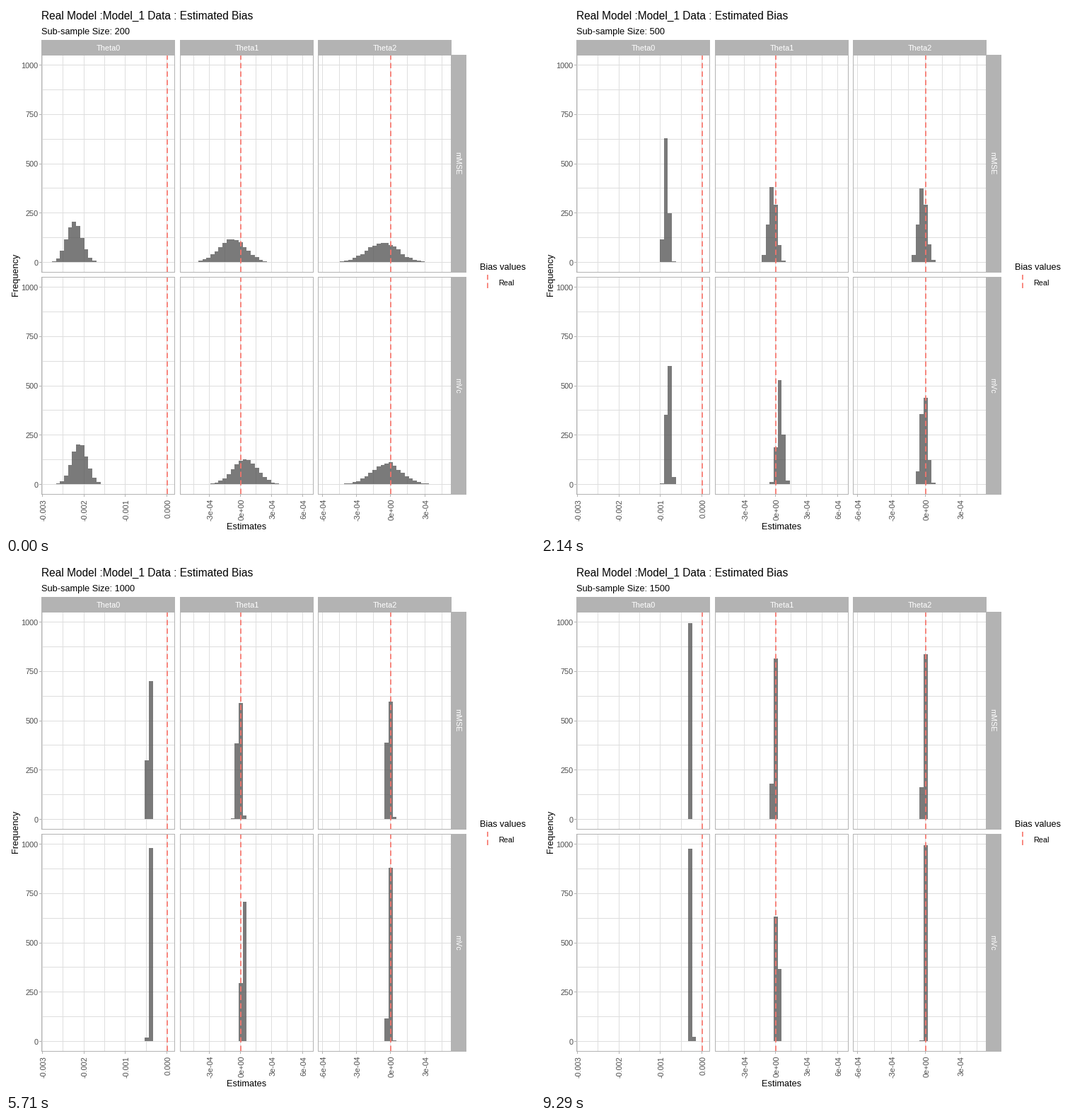
Animation of 748x748 px, one loop 10000 ms. Source, as a matplotlib script:

```python
import math

import matplotlib.pyplot as plt
import numpy as np
from matplotlib.animation import FuncAnimation
from matplotlib.collections import PolyCollection

plt.rcParams["font.family"] = "Liberation Sans"

STAGE = 748
LOOP, INTERVAL, STATES = 10000, 50, 14
BIN = 5.715              # bin width in pixels
UNIT = 0.279             # pixels per count
GRID, BORDER, RED, TICK = "#DEDEDE", "#B3B3B3", "#F8766D", "#4D4D4D"

PANEL_W, PANEL_H = 189, 308
LEFTS = [50, 246, 441]
ZEROS = [227.8, 331.8, 543.8]
STEPS = [58.9, 43.9, 48.3]
TICKS = [range(-3, 1), range(-1, 3), range(-2, 2)]
TOPS = [69, 383]
BASES = [362.5, 676.5]

# Per panel (row, col): mean and spread of the estimates in bins, each
# given as (a, b) of the decay a * u + b * u**2 with u = 1000 / size
MODEL = {
    (0, 0): ((-4.325, -.052), (.20, .035)),
    (0, 1): ((-.37, -.01), (.37, .06)),
    (0, 2): ((-.39, .002), (.30, .10)),
    (1, 0): ((-4.055, -.055), (.14, .048)),
    (1, 1): ((.74, -.10), (.17, .088)),
    (1, 2): ((-.18, 0), (.15, .118)),
}

fig = plt.figure(figsize=(STAGE / 72, STAGE / 72), dpi=72, facecolor="white")
ax = fig.add_axes([0, 0, 1, 1])
ax.set_xlim(0, STAGE)
ax.set_ylim(STAGE, 0)
ax.axis("off")


def rect(x, y, w, h):
    return [(x, y), (x + w, y), (x + w, y + h), (x, y + h)]


def fill(rects, color, z, alpha=1):
    shapes = PolyCollection(rects, facecolors=color, edgecolors="none",
                            linewidths=0, antialiaseds=False, alpha=alpha,
                            zorder=z)
    ax.add_collection(shapes, autolim=False)
    return shapes


def label(x, y, s, size, color="black", ha="left", angle=0):
    return ax.text(x, y, s, fontsize=size, color=color, ha=ha, va="baseline",
                   rotation=angle, rotation_mode="anchor", zorder=6)


def dashes(x, bottom, top):
    ax.plot([x, x], [bottom, top], color=RED, lw=1.7, zorder=4,
            dashes=(7.5 / 1.7, 4.5 / 1.7), dash_capstyle="butt")


def grid_rects(row, col):
    x0, y0 = LEFTS[col], TOPS[row]
    xs = [math.floor(ZEROS[col] + k * STEPS[col] / 2) for k in range(-7, 8)]
    ys = [math.floor(BASES[row] - k * 125 * UNIT) for k in range(9)]
    return ([rect(x, y0, 1, PANEL_H) for x in xs if x0 < x < x0 + PANEL_W]
            + [rect(x0, y, PANEL_W, 1) for y in ys])


def border_rects(row, col):
    x, y, w, h = LEFTS[col], TOPS[row], PANEL_W, PANEL_H
    return [rect(x, y, w, 1), rect(x, y + h - 1, w, 1),
            rect(x, y, 1, h), rect(x + w - 1, y, 1, h)]


def tick_text(col, k):
    if col == 0:
        return f"{k / 1000:.3f}"
    return f"{k * 3e-4:.0e}"


def draw_static():
    grid, grey = [], []
    for row, col in MODEL:
        grid += grid_rects(row, col)
        grey += border_rects(row, col)
        dashes(ZEROS[col], TOPS[row] + PANEL_H - 1, TOPS[row] + 1)

    for row, name in enumerate(["mMSE", "mVc"]):
        grey.append(rect(629, TOPS[row], 22, PANEL_H))
        label(635, TOPS[row] + 153.5, name, 10.9, "white", "center", -90)
        for count in range(0, 1001, 250):
            y = BASES[row] - count * UNIT
            grey.append(rect(47, math.floor(y), 3, 1))
            label(45.5, y + 4.2, str(count), 10.9, TICK, "right")

    for col in range(3):
        grey.append(rect(LEFTS[col], 48, PANEL_W, 21))
        label(LEFTS[col] + 94.5, 63, f"Theta{col}", 10.9, "white", "center")
        for k in TICKS[col]:
            x = ZEROS[col] + k * STEPS[col]
            grey.append(rect(math.floor(x), 691, 1, 3))
            label(x + 5, 697, tick_text(col, k), 10.9, TICK, "right", 90)

    fill(grid, GRID, 1)
    fill(grey, BORDER, 5)
    label(50, 19, "Real Model :Model_1 Data : Estimated Bias", 15.55)
    label(340, 740, "Estimates", 12.8, ha="center")
    label(17.5, 379.5, "Frequency", 12.8, ha="center", angle=90)
    label(670, 372.5, "Bias values", 12.8)
    dashes(680.7, 399, 379.5)
    label(696, 394.5, "Real", 10.9)


def counts(panel, size):
    u = 1000 / size
    mean, spread = (a * u + b * u * u for a, b in MODEL[panel])
    rng = np.random.default_rng(size + 10 * panel[0] + panel[1])

    def below(edge):
        return 0.5 * (1 + math.erf((edge - mean) / spread / math.sqrt(2)))

    # Wide histograms look ragged, narrow ones do not
    for b in range(-30, 20):
        n = 1000 * (below(b + .5) - below(b - .5))
        yield b, round(n + 0.1 * spread * math.sqrt(n) * rng.normal())


def bar(panel, b, count):
    row, col = panel
    left = round(ZEROS[col] + (b - .5) * BIN)
    right = round(ZEROS[col] + (b + .5) * BIN)
    base = round(BASES[row])
    height = base - round(BASES[row] - count * UNIT)
    return rect(left, base - height, right - left, height)


draw_static()
subtitle = label(50, 40, "", 12.8)
bars = fill([], "#595959", 3, alpha=0.8)


def update(i):
    # A state begins within the frame that contains its start time
    state = ((i + 1) * INTERVAL - 1) * STATES // LOOP
    size = 200 + 100 * state
    subtitle.set_text(f"Sub-sample Size: {size}")
    bars.set_verts([bar(p, b, c) for p in MODEL
                    for b, c in counts(p, size) if c > 1])
    return bars, subtitle


anim = FuncAnimation(fig, update, frames=LOOP // INTERVAL, interval=INTERVAL,
                     repeat=True, repeat_delay=0, blit=False)
plt.show()
```
